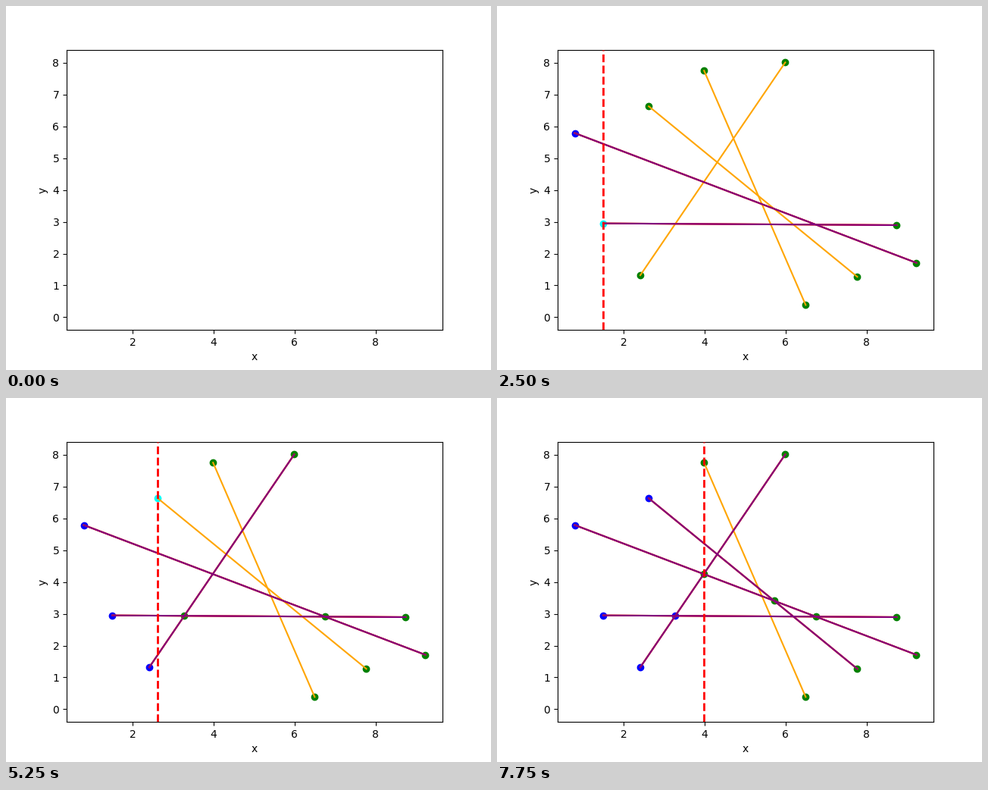
These frames come from a looping animation (640 by 480 pixels, 8000 ms). A matplotlib script:

```python
import numpy as np
import matplotlib.pyplot as plt
from matplotlib.animation import FuncAnimation

SEGMENTS = np.array([
    [(0.79, 5.79), (9.23, 1.71)],
    [(1.50, 2.95), (8.74, 2.895)],
    [(2.41, 1.32), (5.99, 8.01)],
    [(2.62, 6.63), (7.77, 1.27)],
    [(3.985, 7.75), (6.495, 0.385)],
])
FRAMES, INTERVAL = 32, 250


def crossing(i, j):
    """Point where segments i and j meet."""
    (a, b), (c, d) = SEGMENTS[i], SEGMENTS[j]
    t = np.linalg.solve(np.column_stack([b - a, c - d]), c - a)[0]
    return a + t * (b - a)


fig, ax = plt.subplots(figsize=(6.4, 4.8), dpi=100)
ax.set_xlabel("x")
ax.set_ylabel("y")


def padded(low, high):
    pad = 0.05 * (high - low)
    return low - pad, high + pad


ax.set_xlim(*padded(0.79, 9.23))
ax.set_ylim(*padded(0, 8.01))


def make_dot(p):
    return ax.scatter(*p, color="green", zorder=1)


def make_lines(color, zorder):
    return [ax.plot(*s.T, color=color, lw=1.5, zorder=zorder)[0] for s in SEGMENTS]


ends = [make_dot(p) for s in SEGMENTS for p in s]
cross_12, cross_23, cross_14, cross_13 = (
    make_dot(crossing(i, j)) for i, j in [(0, 1), (1, 2), (0, 3), (0, 2)])
dots = ends + [cross_12, cross_23, cross_14, cross_13]

plain = make_lines("orange", 2)
# an active segment is purple laid over red
active = list(zip(make_lines("red", 2.1), make_lines("purple", 2.2)))
sweep = ax.axvline(1, color="red", lw=2, ls="--", zorder=3)


def show(artists):
    return lambda: [a.set_visible(True) for a in artists]


def paint(dot, color):
    return lambda: dot.set_color(color)


def sweep_to(dot):
    def step():
        x = dot.get_offsets()[0][0]
        sweep.set_xdata([x, x])
        sweep.set_visible(True)
    return step


def event(dot, segment=None, found=None):
    """Steps for handling one point of the queue."""
    steps = [sweep_to(dot), paint(dot, "cyan")]
    if segment is not None:
        steps.append(show(active[segment]))
    if found is not None:
        steps.append(show([found]))
    return steps + [paint(dot, "blue"), lambda: sweep.set_visible(False)]


steps = [show(plain), show(ends)]
steps += event(ends[0], segment=0)
steps += event(ends[2], segment=1, found=cross_12)
steps += event(ends[4], segment=2, found=cross_23)
steps += event(ends[6], segment=3, found=cross_14)
steps += event(cross_23, found=cross_13)
steps += event(cross_13)


def reset():
    for artist in dots + plain + [line for pair in active for line in pair] + [sweep]:
        artist.set_visible(False)
    for dot in dots:
        dot.set_color("green")
    return []


def draw(n):
    reset()
    for step in steps[:n]:
        step()
    return []


anim = FuncAnimation(fig, draw, frames=FRAMES, init_func=reset,
                     interval=INTERVAL, repeat=True)
plt.show()
```
